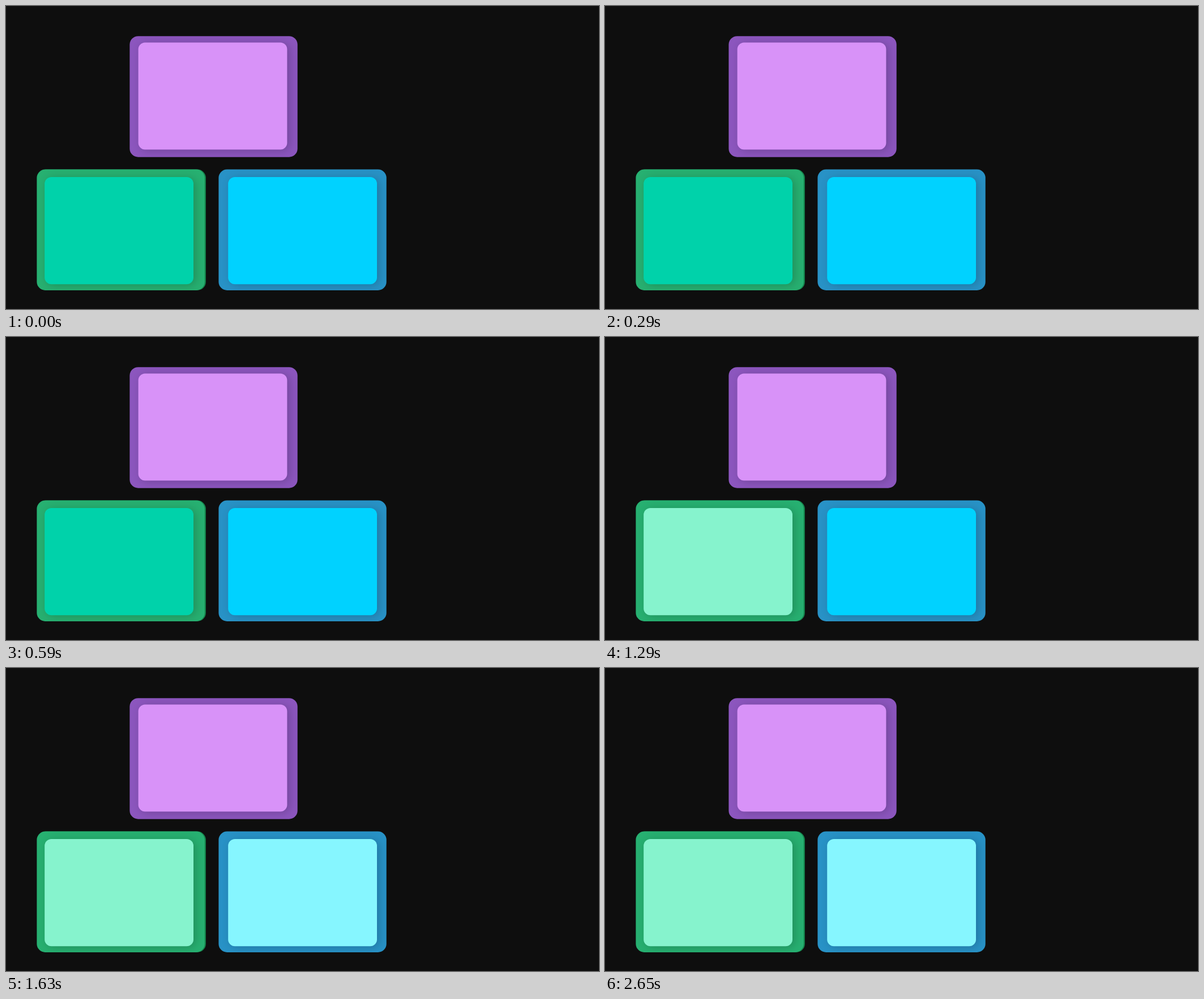
An HTML page with a canvas that plays this animation: 1047x535 px, repeating every 3330 ms.

```html
<!DOCTYPE html>
<html lang="en">
<head>
<meta charset="utf-8">
<title>Pads</title>
<style>
  html, body { margin: 0; width: 100%; height: 100%; overflow: hidden; background: #0e0e0e; }
  canvas { display: block; }
</style>
</head>
<body>
<canvas id="stage" width="1047" height="535"></canvas>
<script>
const ctx = document.getElementById('stage').getContext('2d');
const LOOP = 3330;

// frame and pad are [x, y]; a pad switches to its lit colour at litAt
const FRAME = { w: 296.3, h: 213.5, r: 15 };
const PAD = { w: 262.8, h: 189.2, r: 12 };
const tiles = [
  { frame: [218.4, 53.2], pad: [233.6, 64.4], rim: '#8c56be', base: '#d892f8', lit: '#d892f8', litAt: Infinity },
  { frame: [54.4, 288.5], pad: [68.2, 302], rim: '#27b071', edge: '#15844c', base: '#00d2aa', lit: '#86f3cd', litAt: 790 },
  { frame: [375.4, 288.5], pad: [392.2, 302], rim: '#2892c6', base: '#00d2ff', lit: '#86f6ff', litAt: 1630 }
];

function box([x, y], { w, h, r }, color) {
  ctx.beginPath();
  ctx.roundRect(x, y, w, h, r);
  ctx.fillStyle = color;
  ctx.fill();
}

function drawTile(tile, t) {
  ctx.save();
  if (tile.edge) box([tile.frame[0] + 2.2, tile.frame[1]], FRAME, tile.edge);
  box(tile.frame, FRAME, tile.rim);
  ctx.clip();
  ctx.shadowColor = 'rgba(0, 0, 0, 0.2)';
  ctx.shadowBlur = 16;
  ctx.shadowOffsetX = 4;
  ctx.shadowOffsetY = 2;
  box(tile.pad, PAD, t >= tile.litAt ? tile.lit : tile.base);
  ctx.restore();
}

const start = performance.now();

function render() {
  const t = (performance.now() - start) % LOOP;
  ctx.fillStyle = '#0e0e0e';
  ctx.fillRect(0, 0, 1047, 535);
  tiles.forEach(tile => drawTile(tile, t));
  requestAnimationFrame(render);
}
render();
</script>
</body>
</html>
```
